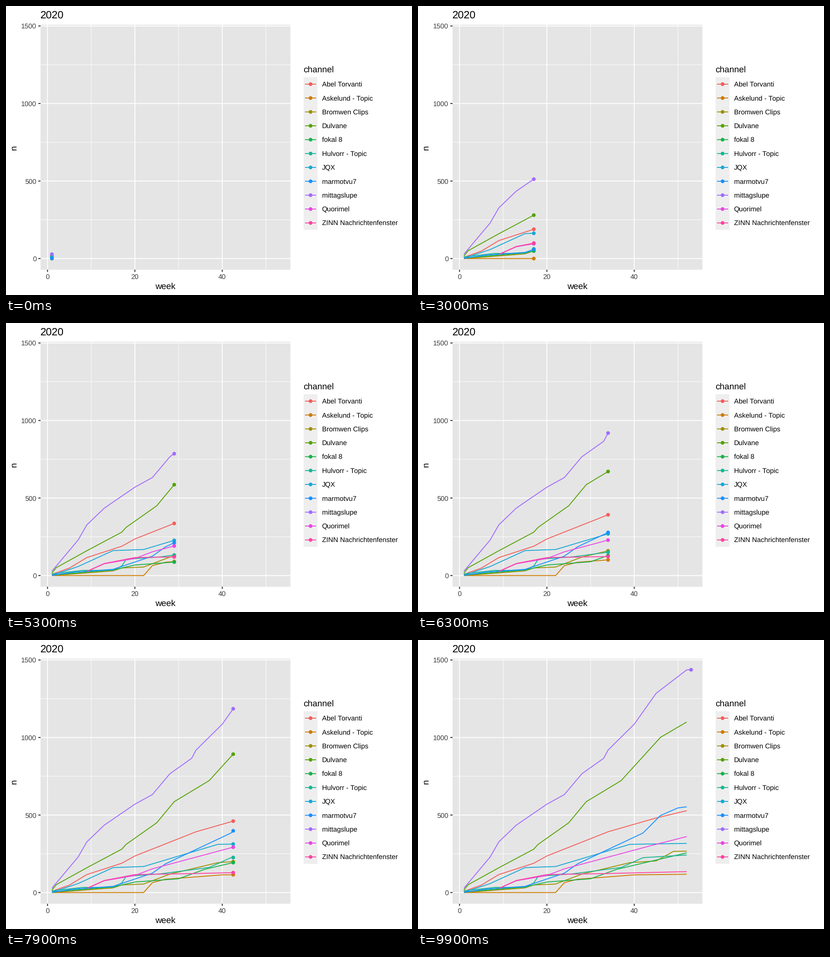
A matplotlib script for the animation above (10 s loop, 885 by 632 pixels).

```python
import numpy as np
import matplotlib.pyplot as plt
from matplotlib.animation import FuncAnimation
from matplotlib.patches import Circle, Rectangle

W, H, DPI = 885, 632, 64
FRAMES, INTERVAL = 100, 100
LAST_WEEK = 53
LEFT, RIGHT, TOP, BOTTOM = 75.3, 620, 40.9, 576.7
THICK, THIN, RADIUS = 1.87, 0.94, 4.06
SMALL, MEDIUM, LARGE = 15.46, 19.33, 23.2
GREY, TICK = "#3A3A3A", "#1F1F1F"

plt.rcParams.update({
    "font.family": "Liberation Sans",
    "path.snap": False,
    "text.hinting": "none",
    "text.hinting_factor": 1,
})


def pt(px):
    return px * 72 / DPI


def px_x(week):
    return 90.5 + 9.523 * np.asarray(week)


def px_y(n):
    return 552.3 - 0.33907 * np.asarray(n)


fig = plt.figure(figsize=(W / DPI, H / DPI), dpi=DPI, facecolor="white")
ax = fig.add_axes([0, 0, 1, 1])
ax.set(xlim=(0, W), ylim=(H, 0))
ax.axis("off")


def box(x0, y0, x1, y1, color):
    ax.add_patch(Rectangle((x0, y0), x1 - x0, y1 - y0, fc=color, lw=0, zorder=0))


def stroke(xs, ys, color, width=THICK, z=1):
    return ax.plot(xs, ys, color=color, lw=pt(width), zorder=z,
                   solid_capstyle="butt", solid_joinstyle="round")[0]


def dot(x, y, color, z=5):
    return ax.add_patch(Circle((x, y), RADIUS, fc=color, lw=0, zorder=z))


def label(x, y, text, size, color="black", ha="left", angle=0):
    ax.text(x, y, text, fontsize=pt(size), color=color, ha=ha, va="baseline",
            rotation=angle, rotation_mode="anchor")


def draw_axes():
    box(LEFT, TOP, RIGHT, BOTTOM, "#E5E5E5")
    for n in range(250, 1500, 500):
        stroke([LEFT, RIGHT], [px_y(n)] * 2, "white", THIN)
    for week in range(10, 60, 20):
        stroke([px_x(week)] * 2, [TOP, BOTTOM], "white", THIN)
    for n in range(0, 1501, 500):
        y = px_y(n)
        stroke([LEFT, RIGHT], [y, y], "white")
        stroke([LEFT - 4.8, LEFT], [y, y], TICK)
        label(66.6, y + 5.6, str(n), SMALL, GREY, "right")
    for week in range(0, 41, 20):
        x = px_x(week)
        stroke([x, x], [TOP, BOTTOM], "white")
        stroke([x, x], [BOTTOM, BOTTOM + 4.8], TICK)
        label(x, 596.7, str(week), SMALL, GREY, "center")
    label(LEFT, 27, "2020", LARGE)
    label(347.6, 619, "week", MEDIUM, ha="center")
    label(22.8, 309.3, "n", MEDIUM, ha="center", angle=90)
    label(648, 144.5, "channel", MEDIUM)


class Channel:
    """A cumulative curve that grows steadily between a few (week, n) points."""
    count = 0

    def __init__(self, name, color, *keys):
        self.weeks, self.values = np.array(keys, float).T
        i = Channel.count
        Channel.count += 1
        self.line = stroke([], [], color, z=2 + i / 100)
        self.dot = dot(0, 0, color, z=4 + i / 100)
        y = 170.9 + 30.35 * i
        box(648.7, y - 15.18, 679, y + 15.18, "#EEEEEE")
        stroke([651.8, 676], [y, y], color)
        dot(663.9, y, color)
        label(688.7, y + 5.6, name, SMALL)

    def show(self, week):
        start, stop = self.weeks[0], self.weeks[-1]
        self.dot.set_visible(start <= week <= stop)
        if week < start:
            self.line.set_data([], [])
            return
        end = min(week, stop)
        w = np.append(self.weeks[self.weeks < end], end)
        x, y = px_x(w), px_y(np.interp(w, self.weeks, self.values))
        self.line.set_data(x, y)
        self.dot.center = x[-1], y[-1]


draw_axes()

channels = [
    Channel("Abel Torvanti", "#F35E5A", (1, 8), (5, 48), (9, 116), (17, 189),
            (20, 236), (34, 392), (45, 481), (52, 528)),
    Channel("Askelund - Topic", "#CE7B00", (1, 0), (22, 0), (24, 64), (27, 86),
            (40, 114), (52, 118)),
    Channel("Bromwen Clips", "#9D9000", (1, 0), (15, 30), (17, 49), (22, 55),
            (28, 119), (39, 193), (45, 204), (49, 266), (52, 267)),
    Channel("Dulvane", "#53A300", (1, 16), (2, 51), (9, 160), (17, 280),
            (18, 311), (25, 450), (29, 586), (37, 722), (46, 1001), (52, 1100)),
    Channel("fokal 8", "#17B24A", (1, 4), (15, 36), (20, 68), (30, 89),
            (36, 150), (52, 256)),
    Channel("Hulvorr - Topic", "#17B594", (1, 11), (8, 33), (15, 34), (17, 62),
            (18, 105), (26, 121), (37, 162), (42, 225), (52, 242)),
    Channel("JQX", "#17A8D6", (1, 2), (7, 58), (15, 161), (22, 168),
            (39, 311), (52, 317)),
    Channel("marmotvu7", "#1790FF", (1, 1), (6, 22), (15, 40), (24, 125),
            (27, 185), (42, 384), (46, 497), (50, 546), (52, 553)),
    Channel("mittagslupe", "#A26AFF", (1, 28), (7, 229), (9, 327), (13, 435),
            (20, 570), (24, 632), (28, 766), (33, 866), (34, 919), (40, 1086),
            (45, 1285), (52, 1436), (53, 1437)),
    Channel("Quorimel", "#E846E4", (9, 26), (13, 76), (20, 110), (24, 153),
            (44, 304), (52, 361)),
    Channel("ZINN Nachrichtenfenster", "#FF42A3", (9, 27), (13, 78), (20, 116),
            (33, 122), (52, 135)),
]

# Each week lands on its nearest whole frame; frames between are interpolated.
WEEKS = np.arange(1, LAST_WEEK + 1)
STOPS = np.round((WEEKS - 1) * (FRAMES - 1) / (LAST_WEEK - 1))


def update(frame):
    week = np.interp(frame, STOPS, WEEKS)
    for channel in channels:
        channel.show(week)
    return []


anim = FuncAnimation(fig, update, frames=FRAMES, interval=INTERVAL,
                     init_func=lambda: update(0), repeat=True, repeat_delay=0)
plt.show()
```
